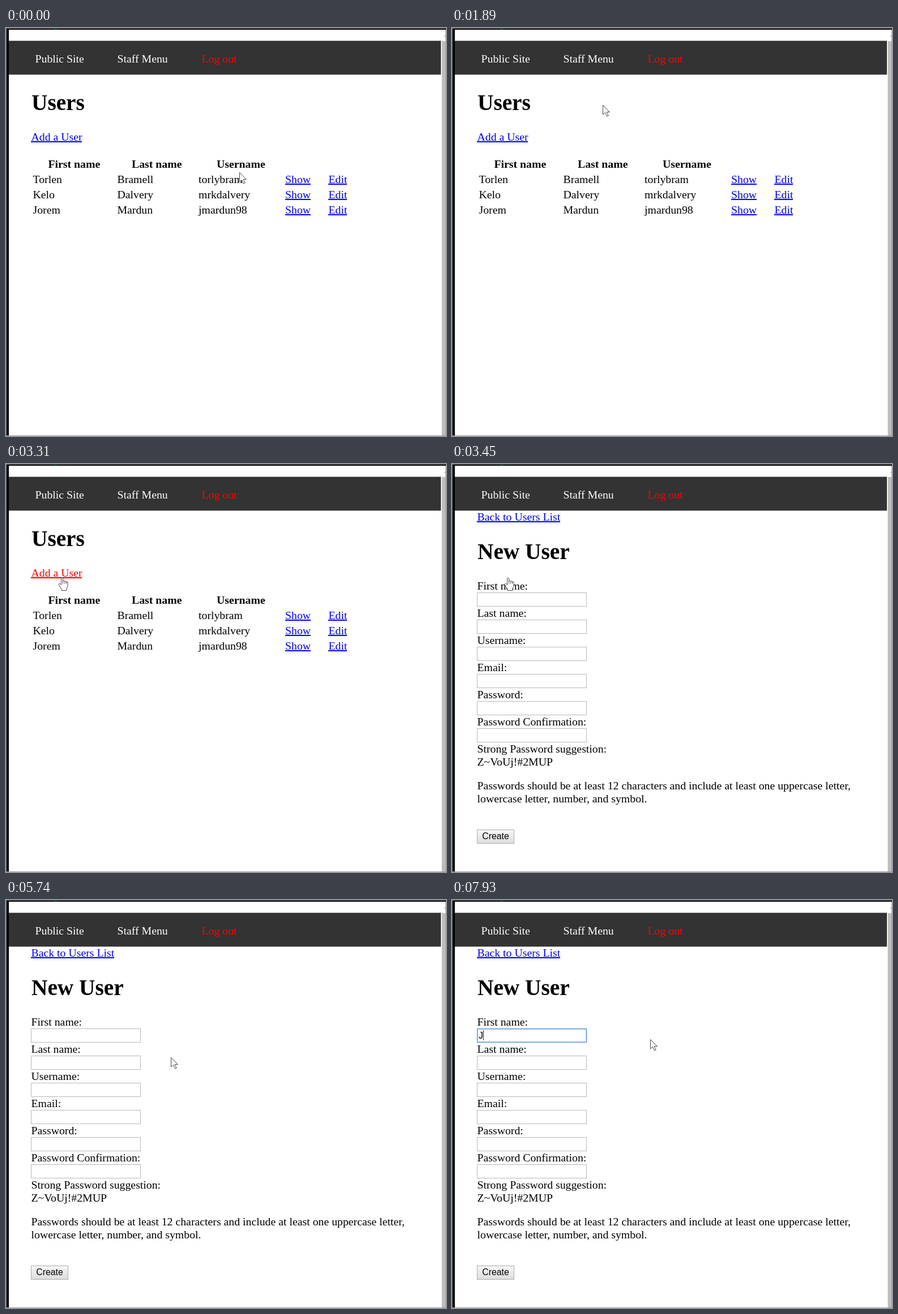
Write an HTML page with a canvas that moves like this. It is 777 px wide and 721 px high and loops after 8 s.

```html
<!DOCTYPE html>
<html lang="en">
<head>
<meta charset="utf-8">
<title>User admin</title>
<style>
html, body { margin: 0; width: 100%; height: 100%; overflow: hidden; background: #fff; }
canvas { display: block; }
</style>
</head>
<body>
<canvas id="stage" width="777" height="721"></canvas>
<script>
const ctx = document.getElementById('stage').getContext('2d');
const LOOP = 8000, STEP = 130;
const PRESS = 3310, OPEN_FORM = 3450, FOCUS = 6850, BLINK = 540;
const TYPED = FOCUS + 2 * BLINK;
const SERIF = '"Liberation Serif", "Times New Roman", serif';
const SANS = '"Liberation Sans", Arial, sans-serif';
const BODY = '19.8px ' + SERIF;
const BOLD = 'bold ' + BODY;
const TITLE = 'bold 39.3px ' + SERIF;
const LEFT = 44.5;
const BLUE = '#0000ee';

const people = [
  ['Torlen', 'Bramell', 'torlybram'],
  ['Kelo', 'Dalvery', 'mrkdalvery'],
  ['Jorem', 'Mardun', 'jmardun98']
];
const columns = [47.5, 196.5, 340];
const labels = ['First name:', 'Last name:', 'Username:', 'Email:', 'Password:', 'Password Confirmation:'];

// Pointer gestures in steps of STEP ms; power shapes the ease-out, bend bows the path
const home = { x: 412, y: 255 };
const moves = [
  { at: 680, steps: 3, x: 497, y: 221 },
  { at: 1090, steps: 3, x: 411, y: 149 },
  { at: 1890, steps: 8, x: 99, y: 200, power: 4.67, bend: -37 },
  { at: 4240, steps: 5, x: 288, y: 286 },
  { at: 5020, steps: 2, x: 294, y: 287 },
  { at: 5740, steps: 1, x: 291, y: 278 },
  { at: 5870, steps: 5, x: 232, y: 251 },
  { at: 6980, steps: 1, x: 247, y: 251 },
  { at: 7120, steps: 2, x: 350, y: 246, power: 4 }
];

const arrow = new Path2D('M.5 .5V17L4.5 13.4L7.6 20L10.2 18.9L7.2 12.5H12.4Z');
const hand = new Path2D('M-1.5 2Q0 -.5 1.5 2V6.8Q3.5 5 4.7 7.2Q6.8 6 7.7 8.2Q9.8 7.4 10 9.8' +
  'V15Q9.7 18 8 20V23.5H-1V20.8Q-4 17 -5.9 13.5Q-6 10.5 -3.5 11.6L-1.5 13.6Z');
const knuckles = new Path2D('M1.5 6.8V11.5M4.7 7.2V11.5M7.7 8.2V11.5');
const beam = new Path2D('M-4 -8H-1L0 -7L1 -8H4M0 -7V7M-4 8H-1L0 7L1 8H4');

function box(x, y, w, h, color) {
  ctx.fillStyle = color;
  ctx.fillRect(x, y, w, h);
}

function frame(x, y, w, h, color) {
  ctx.lineWidth = 1;
  ctx.strokeStyle = color;
  ctx.strokeRect(x + .5, y + .5, w - 1, h - 1);
}

function text(str, x, y, color = '#000', font = BODY) {
  ctx.font = font;
  ctx.fillStyle = color;
  ctx.fillText(str, x, y);
}

function link(str, x, y, color = BLUE) {
  text(str, x, y, color);
  box(Math.floor(x), y + 1, Math.round(ctx.measureText(str).width), 2, color);
}

function drawWindow() {
  box(0, 0, 777, 721, '#fff');
  box(0, 0, 777, 3, '#000');
  box(0, 0, 5, 721, '#000');
  box(0, 0, 777, 1, '#777');
  box(0, 0, 1, 721, '#777');
  box(86, 0, 4, 2, '#1d5a6b');
  box(5, 22.6, 763, 59.8, '#333');
  box(769.5, 23, 7.5, 698, '#bdbdbd');
  box(774, 14, 3, 1, '#888');
  box(776, 3, 1, 718, '#a0a0a0');
  box(0, 720, 777, 1, '#999');
  text('Public Site', 51.5, 61, '#fff');
  text('Staff Menu', 196.5, 61, '#fff');
  text('Log out', 345.5, 61, '#f00');
}

function drawUsers(t) {
  text('Users', 45, 145, '#000', TITLE);
  link('Add a User', LEFT, 199, t < PRESS ? BLUE : '#f00');
  text('First name', 74.5, 247, '#000', BOLD);
  text('Last name', 222, 247, '#000', BOLD);
  text('Username', 372, 247, '#000', BOLD);
  people.forEach((person, row) => {
    const y = 274 + row * 27;
    person.forEach((value, i) => text(value, columns[i], y));
    link('Show', 493, y);
    link('Edit', 569.5, y);
  });
}

function drawField(y, focused) {
  frame(44, y, 194, 25, focused ? '#4f8fe6' : '#b9b9b9');
  if (focused) frame(45, y + 1, 192, 23, '#a9c8f5');
}

function drawButton() {
  const shade = ctx.createLinearGradient(0, 646, 0, 671);
  shade.addColorStop(0, '#f8f8f8');
  shade.addColorStop(1, '#dcdcdc');
  box(44, 646, 66, 25, shade);
  frame(44, 646, 66, 25, '#adadad');
  ctx.textAlign = 'center';
  text('Create', 77, 663, '#000', '15.8px ' + SANS);
  ctx.textAlign = 'left';
}

function drawForm(t) {
  link('Back to Users List', LEFT, 100);
  text('New User', 45, 168, '#000', TITLE);
  labels.forEach((label, i) => {
    text(label, LEFT, 222 + i * 48);
    drawField(227 + i * 48, i === 0 && t >= FOCUS);
  });
  text('Strong Password suggestion:', LEFT, 510);
  text('Z~VoUj!#2MUP', LEFT, 533);
  text('Passwords should be at least 12 characters and include at least one uppercase letter,', LEFT, 575);
  text('lowercase letter, number, and symbol.', LEFT, 598);
  drawButton();

  const typed = t >= TYPED;
  const caretOn = t >= FOCUS && Math.floor((t - FOCUS) / BLINK) % 2 === 0;
  if (typed) text('J', 47, 245, '#000', '16px ' + SANS);
  if (caretOn) box(typed ? 55 : 47, 230, 1, 18, '#222');
}

function pointerAt(t) {
  let { x, y } = home;
  for (const { at, steps, x: toX, y: toY, power = 2, bend = 0 } of moves) {
    if (t < at) break;
    const done = Math.min(1, (Math.floor((t - at) / STEP) + 1) / steps);
    const p = 1 - (1 - done) ** power;
    x += (toX - x) * p;
    y += (toY - y) * p + bend * 4 * p * (1 - p);
  }
  return [Math.round(x), Math.round(y)];
}

function drawPointer(t) {
  ctx.save();
  ctx.translate(...pointerAt(t));
  ctx.lineWidth = .9;
  ctx.strokeStyle = '#333';
  ctx.fillStyle = '#fff';
  if (t >= 6290 && t < 7120) {
    ctx.lineWidth = 1.6;
    ctx.strokeStyle = '#000';
    ctx.stroke(beam);
  } else {
    const isHand = t >= 2280 && t < 4240;
    const shape = isHand ? hand : arrow;
    ctx.fill(shape);
    ctx.stroke(shape);
    if (isHand) ctx.stroke(knuckles);
  }
  ctx.restore();
}

function draw(now) {
  const t = now % LOOP;
  drawWindow();
  if (t < OPEN_FORM) drawUsers(t);
  else drawForm(t);
  drawPointer(t);
}

const start = performance.now();
function tick() {
  draw(performance.now() - start);
  requestAnimationFrame(tick);
}
tick();
</script>
</body>
</html>
```
